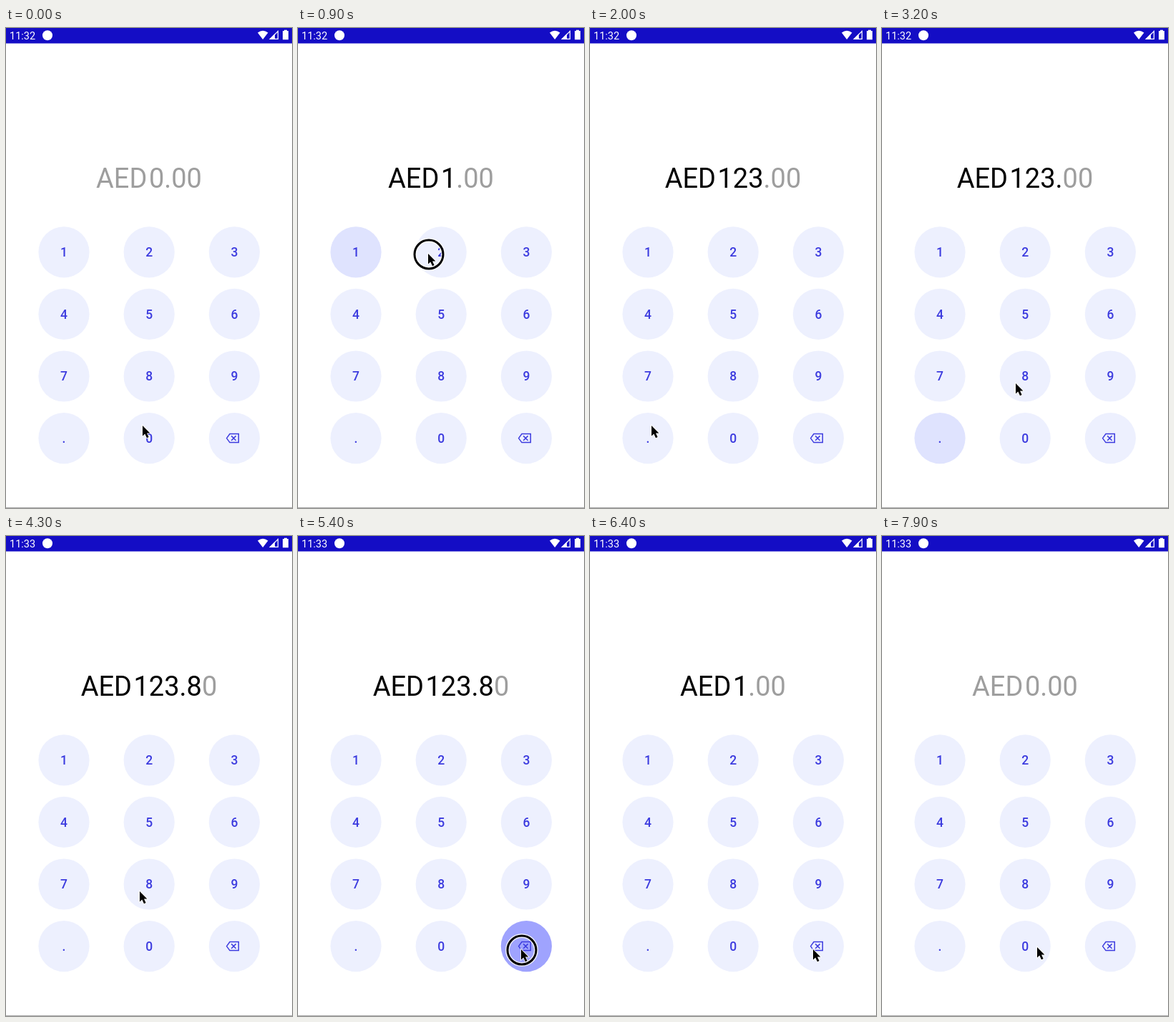
An HTML page that plays this animation: 400x670 px, repeating every 8 s.

```html
<!DOCTYPE html>
<html lang="en">
<head>
<meta charset="utf-8">
<title>Amount keypad</title>
<style>
  html, body { margin: 0; width: 100%; height: 100%; overflow: hidden; background: #fff; }
  svg { display: block; width: 400px; height: 670px; font-family: Roboto, sans-serif; }
  .key { font-size: 17.5px; font-weight: 500; text-anchor: middle; fill: #3c3bdf; }
</style>
</head>
<body>
<svg viewBox="0 0 400 670">
  <rect width="400" height="21.5" fill="#140dc5"/>
  <g fill="#fff">
    <text id="clock" x="5" y="15.6" font-size="14.5"></text>
    <circle cx="58" cy="10.3" r="7"/>
    <path d="M352 6.6Q359.200 .8 366.500 6.600L359.200 16Z"/>
    <path d="M368 16L376 8V16Z"/>
    <path d="M369.500 15.400L380.400 4.500V15.400Z" fill="none" stroke="#fff" stroke-width="1.200"/>
    <path d="M389 4V2.800H393V4H395V16.300H387V4Z"/>
  </g>
  <text id="amount" x="200" y="222.800" dx="0 0 0 2.5" font-size="38" text-anchor="middle"><tspan id="unit">AED</tspan><tspan id="typed" fill="#000"></tspan><tspan id="rest" fill="#9e9e9e"></tspan></text>
  <g id="pad"></g>
  <rect y="669" width="400" height="1" fill="#aaa"/>
  <g id="cursor">
    <g id="ring" fill="none">
      <circle cx="1" cy="1" r="20" stroke="#fff" stroke-opacity=".8" stroke-width="6"/>
      <circle cx="1" cy="1" r="20" stroke="#000" stroke-width="3"/>
    </g>
    <path d="M0 0V14.500L3.300 11.400L6 17.200L8.600 16L6 10.400H10.400Z" stroke="#fff" stroke-width="1.600" paint-order="stroke"/>
  </g>
</svg>
<script>
const LOOP = 8000, STEP = 100;
const $ = id => document.getElementById(id);

// [press time, key]
const clicks = [[400, '1'], [900, '2'], [1300, '3'], [2700, '.'], [3300, '8'],
  [5300, '<'], [5450, '<'], [5600, '<'], [5800, '<'], [6600, '<']];

// [time, x, y] of the pointer tip
const path = [[0, 191, 555], [400, 76, 316], [600, 76, 316], [900, 182, 315],
  [1000, 184, 315], [1300, 304, 317], [1450, 304, 317], [1900, 86, 555],
  [2400, 86, 555], [2700, 80, 576], [2900, 80, 576], [3200, 187, 496],
  [4600, 187, 496], [5000, 305, 606], [5300, 312, 577], [7200, 312, 577],
  [7600, 163, 575], [7900, 217, 574]];

const ripples = {};
$('pad').innerHTML = [...'123456789.0<'].map((key, i) => {
  const x = 81 + i % 3 * 119.2, y = 312.8 + Math.floor(i / 3) * 86.6;
  const disc = `<circle cx="${x}" cy="${y}" r="35.600"`;
  const label = key === '<'
    ? `<path transform="translate(${x - 2.4} ${y})" d="M-8.400 0L-4 -6H8.300V6H-4ZM-1.800 -3.200L4.600 3.200M4.600 -3.200L-1.800 3.200" fill="none" stroke="#3c3bdf" stroke-width="1.500"/>`
    : `<text class="key" x="${x}" y="${y + 6.4}">${key}</text>`;
  return `${disc} fill="#edf0fe"/>${disc} fill="#3338fc" data-key="${key}"/>${label}`;
}).join('');
document.querySelectorAll('[data-key]').forEach(el => ripples[el.dataset.key] = el);

function rippleAlpha(age) {
  if (age < 100 || age >= 600) return 0;
  return 0.42 * Math.min(1, (600 - age) / 400) ** 1.3;
}

function pointerAt(t) {
  const i = path.findIndex(p => p[0] > t);
  if (i < 0) return path.at(-1).slice(1);
  const [t0, ...a] = path[i - 1], [t1, ...b] = path[i];
  const u = (t - t0) / (t1 - t0), e = u * u * (3 - 2 * u);
  return a.map((v, k) => v + (b[k] - v) * e);
}

function draw(t) {
  let typed = '', pressed = false;
  const alpha = {};
  for (const [start, key] of clicks) {
    const age = t - start;
    if (age >= 200) typed = key === '<' ? typed.slice(0, -1) : typed + key;
    if (age >= 0 && age < 200) pressed = true;
    alpha[key] = Math.max(alpha[key] || 0, rippleAlpha(age));
  }
  for (const key in ripples) ripples[key].setAttribute('opacity', alpha[key] || 0);

  const [whole, cents] = typed.split('.');
  $('unit').setAttribute('fill', typed ? '#000' : '#9e9e9e');
  $('typed').textContent = typed;
  $('rest').textContent = cents === undefined
    ? (whole ? '.00' : '0.00') : '00'.slice(cents.length);

  $('clock').textContent = t < 4300 ? '11:32' : '11:33';
  $('ring').setAttribute('visibility', pressed ? 'visible' : 'hidden');
  $('cursor').setAttribute('transform', `translate(${pointerAt(t)})`);
}

const origin = performance.now();
function tick() {
  const t = (performance.now() - origin) % LOOP;
  draw(Math.floor(t / STEP) * STEP);
  requestAnimationFrame(tick);
}
tick();
</script>
</body>
</html>
```
